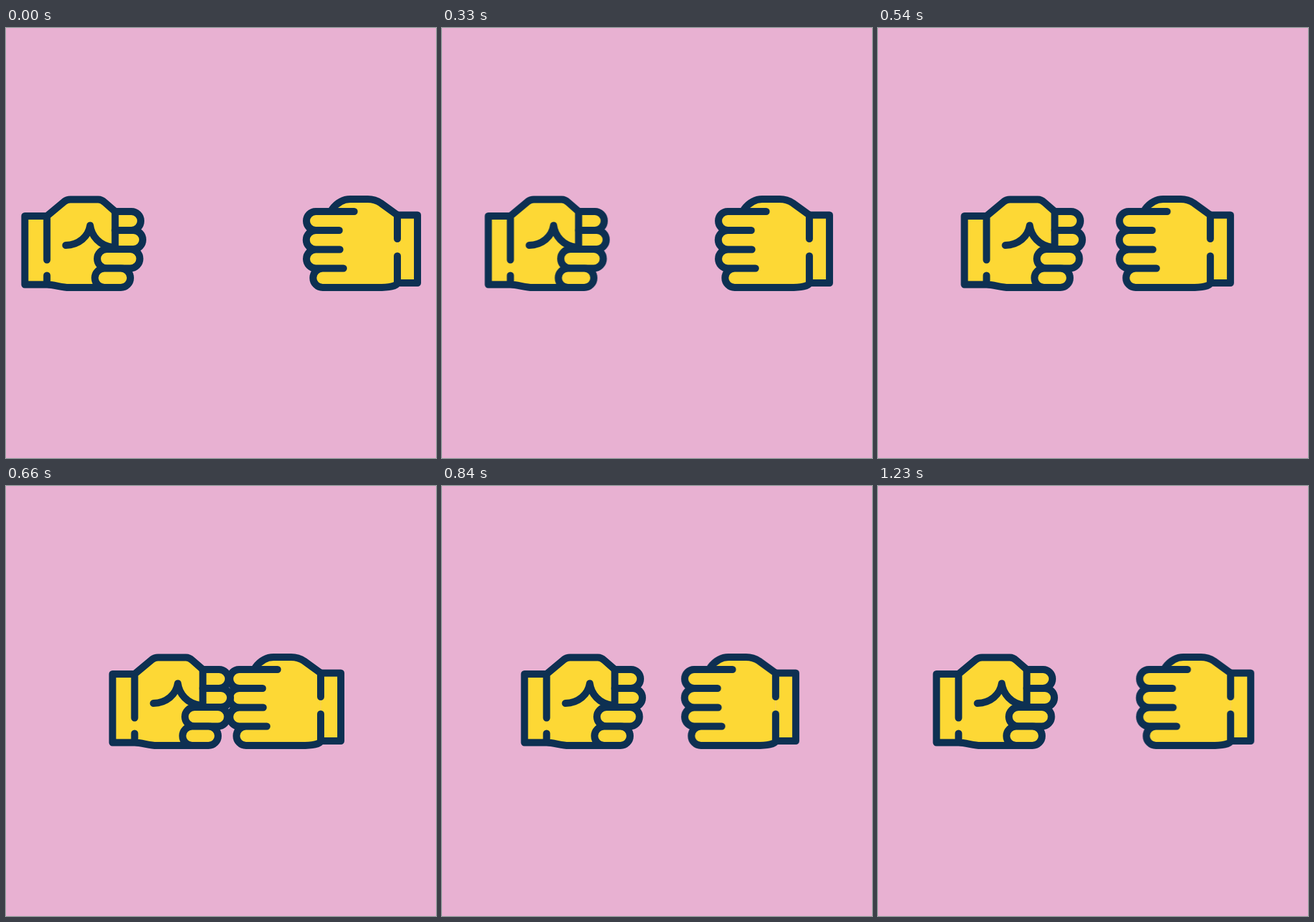
Write an HTML page that moves like this. It is 662 px wide and 662 px high and loops after 1260 ms.

```html
<!DOCTYPE html>
<html lang="en">
<head>
<meta charset="utf-8">
<title>Fist bump</title>
<style>
  html, body { margin: 0; width: 100%; height: 100%; overflow: hidden; background: #e8b1d2; }
  svg { display: block; width: 100vw; height: 100vh; }
  .hand { fill: #fdd835; stroke: #0d3052; stroke-width: 11; stroke-linecap: round; stroke-linejoin: round; }
  .line { fill: none; }
</style>
</head>
<body>
<svg viewBox="0 0 662 662">
  <g id="right" class="hand">
    <path d="M602.5 288H633.5V392.5H602.5Z" stroke="none"/>
    <path class="line" d="M602.5 288H633.5V392.5H602.5"/>
    <path stroke="none" d="M602.5 288L577 269.500Q568 263.500 557 263.500H530Q514 263.500 502 279L499 282.500H477
      a14.500 14.500 0 0 0 0 29a14.500 14.500 0 0 0 0 29.500a14.500 14.500 0 0 0 0 29H487.500
      a14.500 14.500 0 0 0 0 29.500H570Q600 399.500 602.500 393Z"/>
    <path class="line" d="M602.5 288L577 269.500Q568 263.500 557 263.500H530Q514 263.500 502 279"/>
    <path class="line" d="M536 282.500H477a14.500 14.500 0 0 0 0 29H513M477 311.500a14.700 14.700 0 0 0 0 29.500H514
      M477 341a14.500 14.500 0 0 0 0 29H519.500M487.500 370a14.700 14.700 0 0 0 0 29.500H572Q600 399.500 602.500 393V351M602.500 288V324.500"/>
  </g>
  <g id="left" class="hand">
    <path stroke="none" d="M63 289.500H29V395H63L95 399.500H160L168 282.500L152 268.500Q147 264 142 264H99Q94 264 90 267Z"/>
    <path class="line" d="M63 289.500H29V395H63Q68 395 80 397.300T97 399.500H160
      M63 357V289.500L90 267Q94 264 99 264H142Q147 264 152 268.500L168 282.500M63 381V395"/>
    <path d="M168 282.500H193a14.500 14.500 0 0 1 0 29H168Z"/>
    <path d="M168 311.500H196a14.500 14.500 0 0 1 0 29H168Z"/>
    <path class="line" d="M92 334.500C112 334 127 321 129.500 304C131.500 320 144 335 164 337.500"/>
    <rect x="140.500" y="340.500" width="65.500" height="29.500" rx="14.700"/>
    <rect x="136.800" y="370" width="54.700" height="29.500" rx="14.700"/>
  </g>
</svg>
<script>
  const LOOP = 1260, STEP = 30, FRAMES = LOOP / STEP;
  const START = 60, HIT = 660, REST = 1020;

  const clamp = v => Math.min(1, Math.max(0, v));
  const smooth = u => u * u * (3 - 2 * u);

  // Ease in slowly, arrive almost at full speed: cubic-bezier(.37, 0, .9, 1)
  function punch(x) {
    let lo = 0, hi = 1;
    for (let i = 0; i < 30; i++) {
      const t = (lo + hi) / 2, r = 1 - t;
      const at = 3 * r * r * t * 0.37 + 3 * r * t * t * 0.9 + t * t * t;
      if (at < x) lo = t; else hi = t;
    }
    return smooth(lo);
  }

  function offset(time, hit, rest) {
    if (time < HIT) return hit * punch(clamp((time - START) / (HIT - START)));
    return hit + (rest - hit) * smooth(clamp((time - HIT) / (REST - HIT)));
  }

  // One held pose per step; offsets sit just before each boundary
  function play(id, hit, rest) {
    const frames = [];
    for (let i = 0; i < FRAMES; i++) {
      frames.push({
        offset: Math.max(0, (i - 0.03) / FRAMES),
        transform: `translateX(${offset(i * STEP, hit, rest).toFixed(2)}px)`,
        easing: 'steps(1, end)'
      });
    }
    frames.push({ ...frames[FRAMES - 1], offset: 1 });
    document.getElementById(id).animate(frames, { duration: LOOP, iterations: Infinity });
  }

  play('left', 135, 61);
  play('right', -118, -59.7);
</script>
</body>
</html>
```
